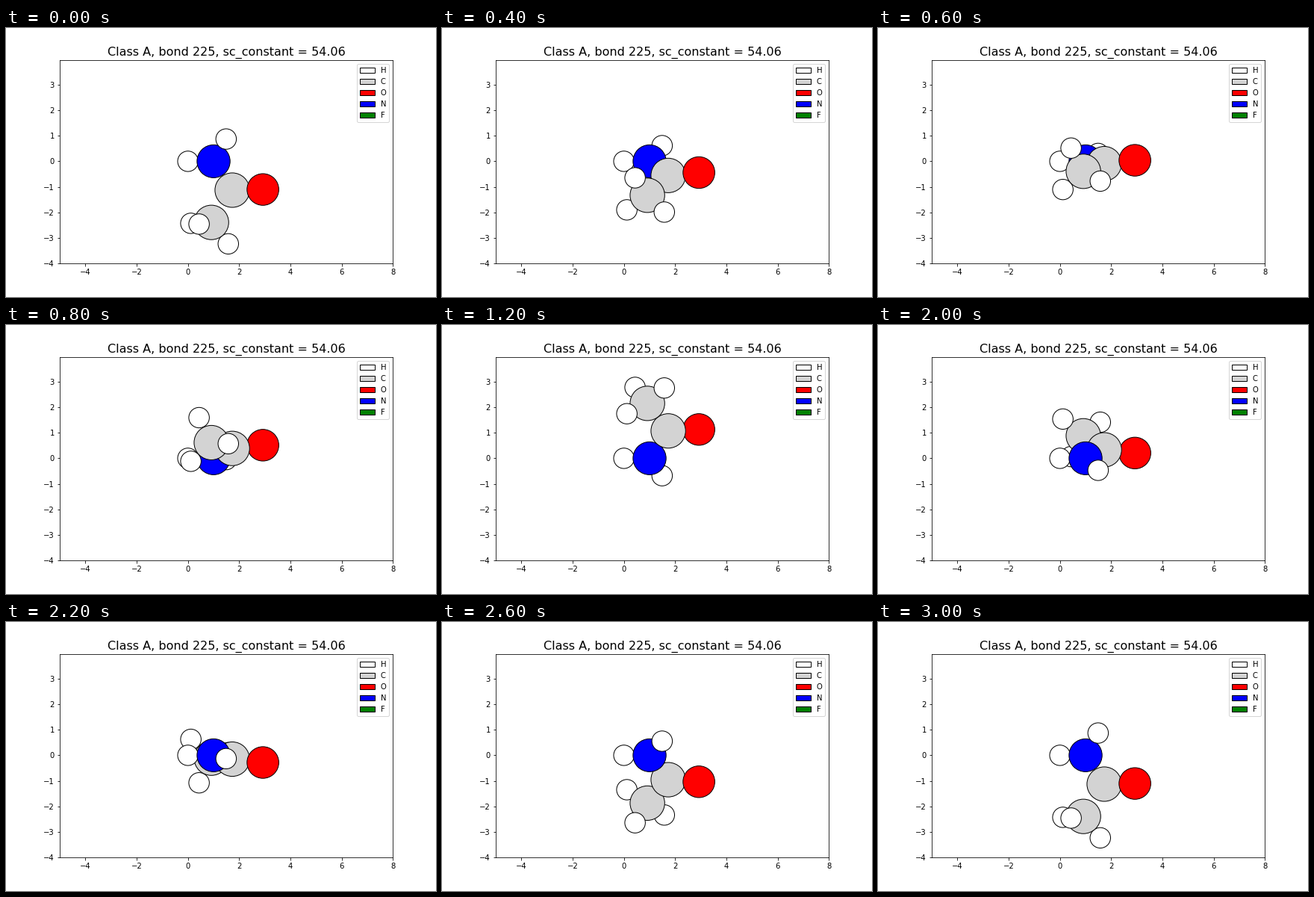
Write a matplotlib script that moves like this. It is 576 px wide and 360 px high and loops after 3200 ms.

```python
import numpy as np
import matplotlib.pyplot as plt
from matplotlib.animation import FuncAnimation
from matplotlib.patches import Circle, Patch

FRAMES = 16
LOOP_MS = 3200

COLORS = {"H": "white", "C": "lightgray", "O": "red", "N": "blue", "F": "green"}
RADII = {"H": 0.4, "C": 0.675, "O": 0.62, "N": 0.645}

# element, x, y, depth (larger is nearer to the viewer)
ATOMS = [
    ("H", 0.00, 0.0, 0.0),
    ("N", 1.00, 0.0, 0.0),
    ("H", 1.49, 0.872, 0.04),
    ("C", 1.73, -1.13, 0.27),
    ("O", 2.925, -1.105, 0.40),
    ("C", 0.915, -2.395, 0.365),
    ("H", 0.115, -2.43, -0.373),
    ("H", 0.435, -2.46, 1.343),
    ("H", 1.575, -3.235, 0.235),
]

plt.rcParams["font.family"] = "DejaVu Sans"
fig, ax = plt.subplots(figsize=(8, 5), dpi=72)
fig.subplots_adjust(left=0.125, right=0.9, bottom=0.125, top=0.88)
ax.set_xlim(-5, 8)
ax.set_ylim(-4, 3.958)
ax.set_xticks(range(-4, 9, 2))
ax.set_yticks(range(-4, 4))
ax.set_title("Class A, bond 225, sc_constant = 54.06", fontsize=16)
ax.legend(
    handles=[Patch(facecolor=c, edgecolor="black", label=e) for e, c in COLORS.items()],
    loc="upper right",
)

balls = [
    ax.add_patch(Circle((x, y), RADII[e], facecolor=COLORS[e], edgecolor="black", linewidth=1))
    for e, x, y, _ in ATOMS
]


def update(i):
    # Full turn about the x axis; first and last poses coincide.
    angle = 2 * np.pi * i / (FRAMES - 1)
    c, s = np.cos(angle), np.sin(angle)
    for ball, (_, x, y, z) in zip(balls, ATOMS):
        ball.set_center((x, y * c + z * s))
        ball.set_zorder(1.5 + 0.1 * (z * c - y * s))
    return balls


anim = FuncAnimation(fig, update, frames=FRAMES, interval=LOOP_MS // FRAMES, repeat=True)
plt.show()
```
